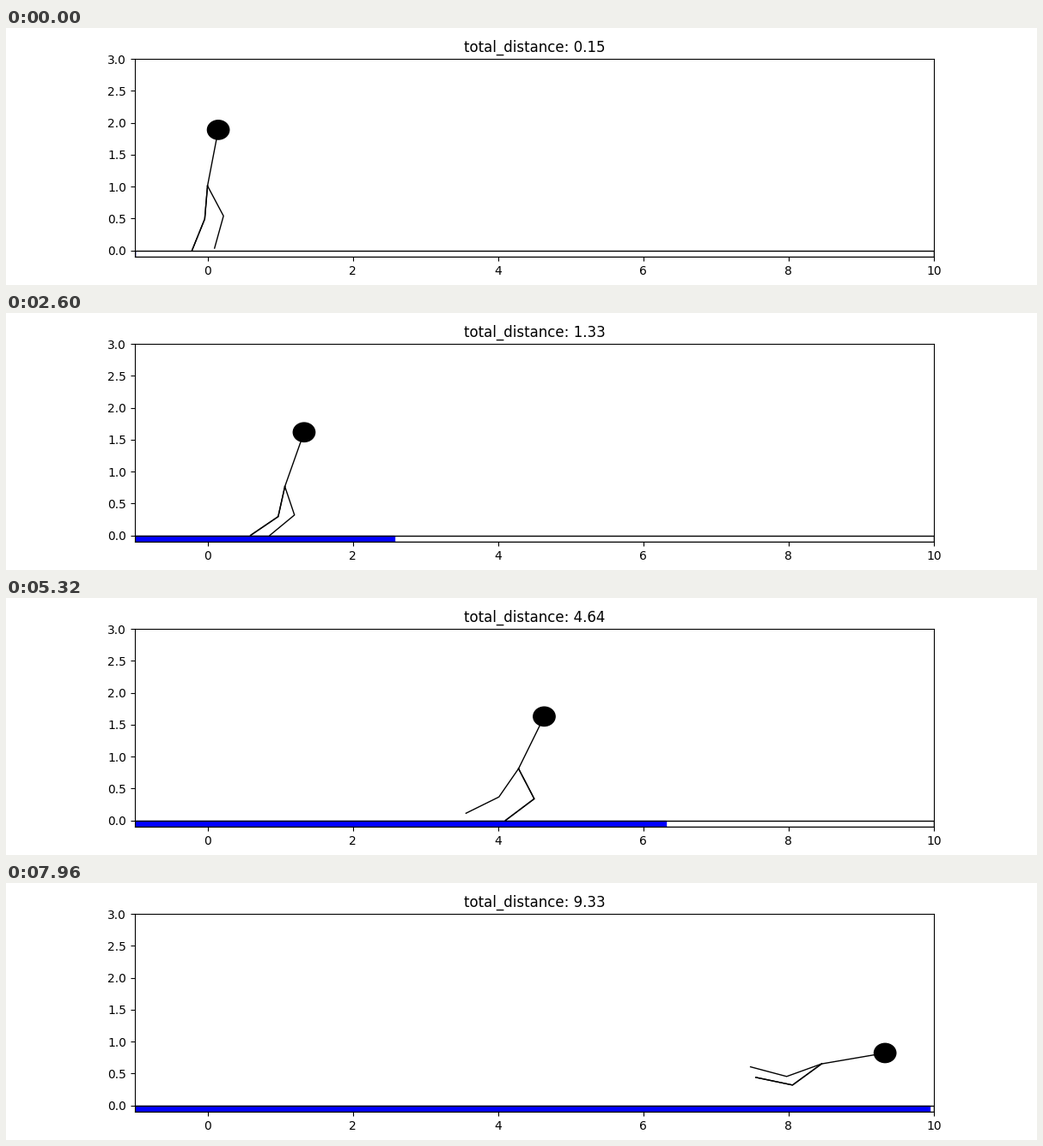
Write a matplotlib script that moves like this. It is 1200x300 px and loops after 8 s.

```python
import numpy as np
import matplotlib.pyplot as plt
from matplotlib.animation import FuncAnimation
from matplotlib.patches import Circle, Rectangle

FRAMES, INTERVAL = 200, 40
X_MIN, X_MAX, FLOOR = -1, 10, -.1
TORSO, LIMB, HEAD_RADIUS = .89, .52, .15
SWING = 50  # thigh swing in degrees

# Time, hip x, hip y, forward lean and gait phase (degrees)
KEYS = np.array([
    (0, 0, 1.01, 9.6, -73),
    (26, .104, .65, 6.2, 26),
    (65, 1.065, .765, 17.3, 434),
    (96, 2.407, .777, 7.3, 720),
    (133, 4.282, .81, 23.4, 956),
    (180, 7.268, .75, 19.3, 1381),
    (199, 8.454, .65, 79, 1540),
])
TIMES, VALUES = KEYS[:, 0], KEYS[:, 1:]


def monotone_slopes():
    """Tangents that keep the curves from overshooting the keys."""
    rates = np.diff(VALUES, axis=0) / np.diff(TIMES)[:, None]
    before, after = rates[:-1], rates[1:]
    same_way = before * after > 0
    inner = np.where(same_way, 2 * before * after / np.where(same_way, before + after, 1), 0)
    return np.vstack([rates[0], inner, rates[-1]])


SLOPES = monotone_slopes()


def motion(t):
    i = min(np.searchsorted(TIMES, t, side="right") - 1, len(TIMES) - 2)
    span = TIMES[i + 1] - TIMES[i]
    u = (t - TIMES[i]) / span
    ease = u * u * (3 - 2 * u)
    return (VALUES[i] * (1 - ease) + VALUES[i + 1] * ease
            + span * u * (1 - u) * ((1 - u) * SLOPES[i] - u * SLOPES[i + 1]))


def hanging(degrees):
    """Unit vector of a limb hanging from its joint, forward is positive."""
    angle = np.radians(degrees)
    return np.array([np.sin(angle), -np.cos(angle)])


def leg(hip, thigh, shank):
    """Hip, knee and foot; the limbs shorten so the foot stays above ground."""
    upper, lower = hanging(thigh), hanging(shank)
    reach = -(upper + lower)[1]
    length = min(LIMB, hip[1] / reach) if reach > 0 else LIMB
    knee = hip + length * upper
    return np.array([hip, knee, knee + length * lower])


def walker(t):
    x, y, lean, phase = motion(t)
    hip = np.array([x, y])
    head = hip - TORSO * hanging(-lean) * [1, 1]
    swing = -SWING * np.cos(np.radians(phase))
    thigh = 20 - lean
    shank = -34 - .9 * lean + 26 * np.exp(-t / 8)
    legs = [leg(hip, thigh + s, shank + .2 * s) for s in (swing, -swing)]
    return hip, head, legs


fig, ax = plt.subplots(figsize=(12, 3), dpi=100)
ax.set_xlim(X_MIN, X_MAX)
ax.set_ylim(FLOOR, 3)
title = ax.set_title("")

progress = ax.add_patch(Rectangle((X_MIN, FLOOR), 0, -FLOOR, color="blue"))
ax.add_patch(Rectangle((X_MIN, FLOOR), X_MAX - X_MIN, -FLOOR,
                       fill=False, edgecolor="black", lw=1))
head_disc = ax.add_patch(Circle((0, 0), HEAD_RADIUS, color="black"))
torso, thin_leg, *strong_leg = [
    ax.plot([], [], color="black", lw=1)[0] for _ in range(4)]


def update(frame):
    hip, head, (strong, thin) = walker(frame)
    head_disc.center = head
    torso.set_data(*np.array([hip, head]).T)
    thin_leg.set_data(*thin.T)
    for line in strong_leg:
        line.set_data(*strong.T)
    progress.set_width((X_MAX - X_MIN) * frame / FRAMES)
    title.set_text(f"total_distance: {head[0]:.2f}")
    return progress, head_disc, torso, thin_leg, *strong_leg, title


anim = FuncAnimation(fig, update, frames=FRAMES, interval=INTERVAL, repeat=True)
plt.show()
```
